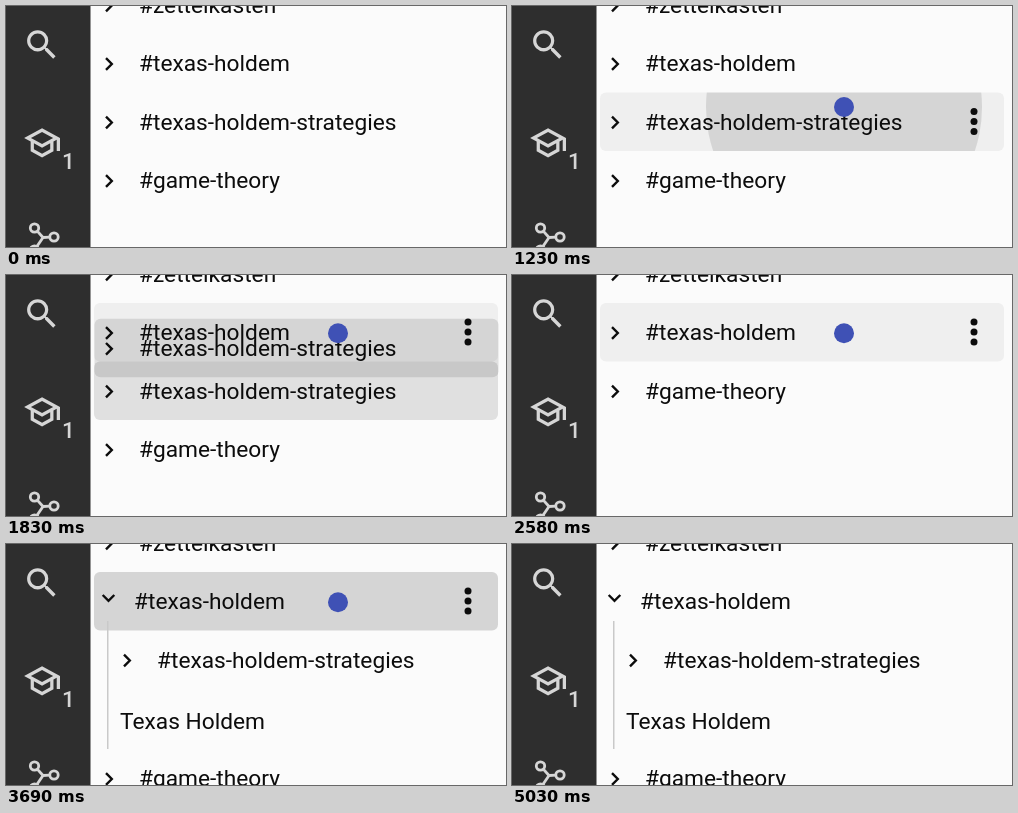
These frames come from a looping animation (500x241 px, 6150 ms). An HTML page with a canvas:

```html
<!DOCTYPE html>
<html lang="en">
<head>
<meta charset="utf-8">
<title>Nesting tags by dragging</title>
<style>
  html, body { margin: 0; width: 100%; height: 100%; overflow: hidden; background: #fbfbfb; }
  canvas { display: block; width: 500px; height: 241px; }
</style>
</head>
<body>
<canvas id="stage"></canvas>
<script>
const W = 500, H = 241, LOOP = 6150, STEP = 120;
const ROW_X = 88, ROW_W = 404, ROW_H = 58.5;
const BACK = '#fbfbfb', HOVER = '#efefef', INK = '#0c0c0c', ICON = '#d6d6d6', ACCENT = '#3f51b5';
const PRESS = 0.11;
const DROP = 2580, EXPAND = 3570;
const PHASES = [0, 500, 1230, 2580, 3330, 4790];

// Pointer keys: time, x, y
const PATH = [
  [500, 332, 186], [620, 332, 166], [740, 332, 137], [860, 332, 112], [980, 332, 101],
  [1230, 332, 101], [1350, 333, 97], [1470, 334, 85], [1590, 334, 73], [1710, 333, 63],
  [1830, 332, 58.3], [4670, 332, 58.3], [4790, 332, 108], [4910, 332, 190], [5030, 332, 260]
];

const canvas = document.getElementById('stage');
const c = canvas.getContext('2d');
const dpr = window.devicePixelRatio || 1;
canvas.width = W * dpr;
canvas.height = H * dpr;

const search = new Path2D('M15.5 14h-.79l-.28-.27A6.47 6.47 0 0 0 16 9.5 6.5 6.5 0 1 0 9.5 16c1.61 0 3.09-.59 4.23-1.57l.27.28v.79l5 4.99L20.49 19l-4.99-5zm-6 0C7.01 14 5 11.99 5 9.5S7.01 5 9.5 5 14 7.01 14 9.5 11.99 14 9.5 14z');
const school = new Path2D('M12 3L1 9l4 2.18v6L12 21l7-3.82v-6l2-1.09V17h2V9L12 3zm6.82 6L12 12.72 5.18 9 12 5.28 18.82 9zM17 15.99l-5 2.73-5-2.73v-3.72L12 15l5-2.73v3.72z');

const rowTop = i => 28 + ROW_H * i;
const clamp = v => Math.max(0, Math.min(1, v));
const ramp = (t, a, b) => clamp((t - a) / (b - a));

function stepped(t) {
  const start = PHASES.filter(p => p <= t).pop();
  return start + Math.floor((t - start) / STEP) * STEP;
}

function pointerAt(t) {
  if (t < 500 || t >= 5030) return null;
  const i = PATH.findIndex(k => k[0] > t);
  const [t0, x0, y0] = PATH[i - 1], [t1, x1, y1] = PATH[i];
  const k = (t - t0) / (t1 - t0);
  return { x: x0 + (x1 - x0) * k, y: y0 + (y1 - y0) * k };
}

function text(str, x, y, font = '22.73px Roboto, sans-serif', color = INK) {
  c.font = font;
  c.fillStyle = color;
  c.fillText(str, x, y);
}

function disc(x, y, r, color) {
  c.fillStyle = color;
  c.beginPath();
  c.arc(x, y, r, 0, Math.PI * 2);
  c.fill();
}

function ring(x, y, r) {
  c.beginPath();
  c.arc(x, y, r, 0, Math.PI * 2);
  c.stroke();
}

function icon(path, x, y) {
  c.save();
  c.translate(x, y);
  c.scale(1.63, 1.63);
  c.fillStyle = ICON;
  c.fill(path);
  c.restore();
}

function chevron(x, y, turn = 0) {
  c.save();
  c.translate(x, y);
  c.rotate(turn * Math.PI / 2);
  c.strokeStyle = INK;
  c.lineWidth = 2.4;
  c.beginPath();
  c.moveTo(-3, -5.8);
  c.lineTo(2.8, 0);
  c.lineTo(-3, 5.8);
  c.stroke();
  c.restore();
}

function rowPath(x, y) {
  c.beginPath();
  c.roundRect(x, y, ROW_W, ROW_H, 6);
}

function fillRow(x, y, color) {
  rowPath(x, y);
  c.fillStyle = color;
  c.fill();
}

function ripple(y, at, grow, alpha) {
  if (grow <= 0 || alpha <= 0) return;
  c.save();
  rowPath(ROW_X, y);
  c.clip();
  disc(at.x, at.y, 90 + 240 * grow, `rgba(0,0,0,${alpha})`);
  c.restore();
}

function tag(name, y, shift = 0) {
  chevron(103 + shift, y + 30);
  text(name, 133 + shift, y + 37);
}

function menuDots(y) {
  for (const d of [-10, 0, 10]) disc(462, y + 29 + d, 3.5, INK);
}

function sidebar() {
  c.fillStyle = '#2e2e2e';
  c.fillRect(0, 0, 84.5, H);
  icon(search, 16.2, 19.3);
  icon(school, 16.5, 117.3);
  text('1', 56, 163, '500 22.5px Roboto, sans-serif', ICON);
  c.strokeStyle = ICON;
  c.lineWidth = 2.8;
  const hub = [37, 231.5];
  for (const [x, y] of [[28.5, 222], [48, 231], [28.5, 244]]) {
    const gap = 4.2 / Math.hypot(hub[0] - x, hub[1] - y);
    ring(x, y, 4.2);
    c.beginPath();
    c.moveTo(x + (hub[0] - x) * gap, y + (hub[1] - y) * gap);
    c.lineTo(...hub);
    c.stroke();
  }
}

function hoveredRow(t, p) {
  if (!p) return -1;
  if (t >= 1230 && t < DROP) return p.y < 70 ? 0 : 1;
  return Math.floor((p.y - 28) / ROW_H);
}

function draw(time) {
  const t = stepped(time);
  const p = pointerAt(t);
  const merged = t >= DROP, open = t >= EXPAND;
  const hover = hoveredRow(t, p);

  c.setTransform(dpr, 0, 0, dpr, 0, 0);
  c.fillStyle = BACK;
  c.fillRect(0, 0, W, H);

  if (hover >= 0) fillRow(ROW_X, rowTop(hover), HOVER);
  if (t >= 1230 && !merged) ripple(rowTop(1), p, ramp(t, 1200, 1350), PRESS);
  if (t >= 3330 && t < 4170) {
    ripple(rowTop(0), p, ramp(t, 3300, 3450), PRESS * (1 - ramp(t, 3690, 4170)));
  }

  tag('#zettelkasten', rowTop(-1));
  if (open) {
    chevron(102.5, 54, ramp(t, 3450, 3690));
    text('#texas-holdem', 128, rowTop(0) + 37);
    c.fillStyle = '#c9c9c9';
    c.fillRect(101, 77, 1.5, 128);
    tag('#texas-holdem-strategies', rowTop(1), 18);
    text('Texas Holdem', 114, 185);
    tag('#game-theory', 205);
  } else {
    tag('#texas-holdem', rowTop(0));
    if (!merged) tag('#texas-holdem-strategies', rowTop(1));
    tag('#game-theory', rowTop(merged ? 1 : 2));
  }

  if (t >= 1350 && !merged) {
    const dx = p.x - 332, dy = p.y - 101;
    fillRow(ROW_X + dx + 0.5, rowTop(1) + dy, `rgba(0,0,0,${PRESS})`);
    c.save();
    c.translate(dx, dy);
    tag('#texas-holdem-strategies', rowTop(1));
    c.restore();
  }

  if (hover >= 0) menuDots(rowTop(hover));
  sidebar();
  if (p) disc(p.x, p.y, 10, ACCENT);
}

const began = performance.now();
function loop() {
  draw((performance.now() - began) % LOOP);
  requestAnimationFrame(loop);
}
loop();
</script>
</body>
</html>
```
